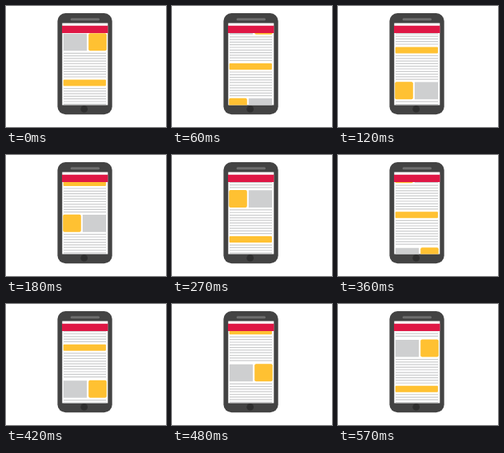
An HTML page with a canvas that plays this animation: 200x152 px, repeating every 600 ms.

```html
<!DOCTYPE html>
<html lang="en">
<head>
<meta charset="utf-8">
<title>Scrolling phone</title>
<style>
html, body { margin: 0; width: 100%; height: 100%; overflow: hidden; background: #fff; }
canvas { display: block; width: 200px; height: 152px; }
</style>
</head>
<body>
<canvas id="stage"></canvas>
<script>
const W = 200, H = 152;
const LOOP = 600, STEP = 30;
const PAGE = 205;                     // page height, scrolled once per loop
const SPEED = PAGE * STEP / LOOP;     // scroll distance per step
const TOP = 34.3, HALF = 101.9;       // first section, offset of the second
const GREY = '#cecfd0', YELLOW = '#ffc132', RED = '#df1745';
const DARK = '#434343';

const canvas = document.getElementById('stage');
const ctx = canvas.getContext('2d');
const ratio = window.devicePixelRatio || 1;
canvas.width = W * ratio;
canvas.height = H * ratio;

function box(x, y, w, h, color, r = 0) {
  ctx.fillStyle = color;
  ctx.beginPath();
  ctx.roundRect(x, y, w, h, r);
  ctx.fill();
}

function lines(y) {
  for (let i = 0; i < 10; i++) box(72, y + i * 3.3, 53, 1.2, '#cbcccd');
}

function section(y, flipped) {
  if (flipped) {
    box(71.2, y, 22.6, 22, YELLOW, 2);
    box(95.8, y + 0.4, 29.4, 21.6, GREY);
  } else {
    box(71.8, y + 0.5, 29.2, 21.5, GREY);
    box(103.2, y, 22.5, 22, YELLOW, 2);
  }
  lines(y + 24.4);
  box(71.7, y + 58.1, 53.2, 8, YELLOW, 1);
  lines(y + 68.6);
}

function draw(time) {
  const scroll = Math.floor((time % LOOP) / STEP) * SPEED;
  ctx.setTransform(ratio, 0, 0, ratio, 0, 0);
  box(0, 0, W, H, '#fff');
  box(64.4, 9, 68.3, 127.3, DARK, 10);
  box(80.6, 15.2, 36.4, 3, '#6e6e6e', 1.5);
  box(70.3, 21.6, 57, 102.8, '#fff');

  ctx.save();
  ctx.beginPath();
  ctx.rect(70.3, 33, 57, 91.4);
  ctx.clip();
  for (const y of [TOP - scroll, TOP + PAGE - scroll]) {
    section(y, false);
    section(y + HALF, true);
  }
  ctx.restore();

  box(70, 24.7, 57.4, 9.2, RED);
  ctx.fillStyle = '#2e2e2e';
  ctx.beginPath();
  ctx.arc(97.7, 129.4, 4.4, 0, Math.PI * 2);
  ctx.fill();
}

function tick() {
  draw(performance.now() - start);
  requestAnimationFrame(tick);
}

const start = performance.now();
tick();
</script>
</body>
</html>
```
